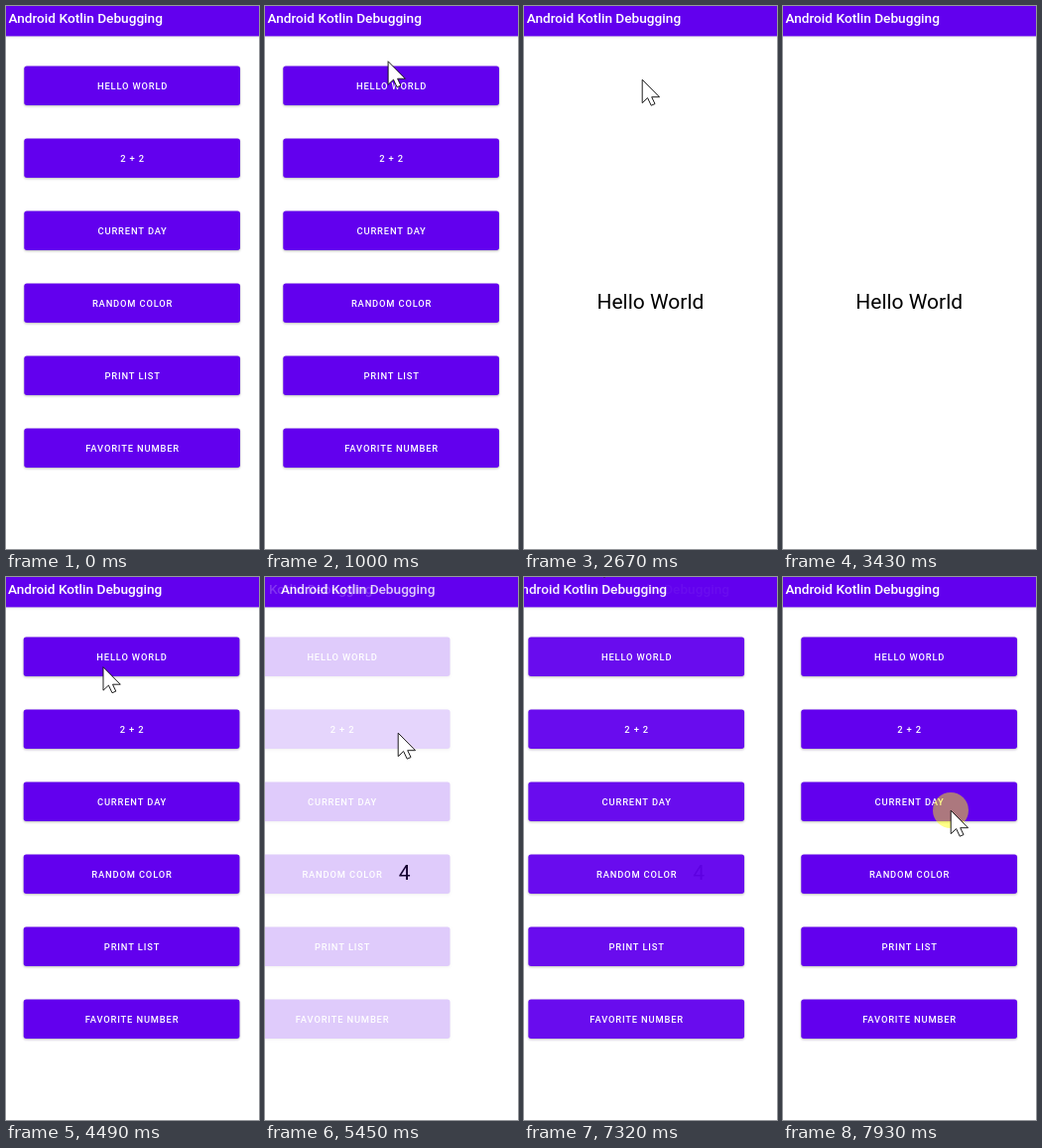
Write an HTML page with a canvas that moves like this. It is 255 px wide and 547 px high and loops after 8 s.

```html
<!DOCTYPE html>
<html lang="en">
<head>
<meta charset="utf-8">
<title>Android Kotlin Debugging</title>
<style>
  html, body { margin: 0; width: 100%; height: 100%; overflow: hidden; background: #fff; }
  canvas { display: block; }
</style>
</head>
<body>
<canvas id="stage" width="255" height="547"></canvas>
<script>
const W = 255, H = 547, LOOP = 8000;
const PURPLE = '#6200ee';
const SLIDE = 63, SLIDE_MS = 450, FADE_MS = 83;
const LABELS = ['HELLO WORLD', '2 + 2', 'CURRENT DAY', 'RANDOM COLOR', 'PRINT LIST', 'FAVORITE NUMBER'];
const BUTTON = { x: 18.3, y: 60.5, w: 217.7, h: 39.4, pitch: 73, r: 2.7 };

// Each press opens a result page, which later closes back to the menu.
const PRESS_MS = 210, OPEN_DELAY = 235;
const VISITS = [
  { text: 'Hello World', button: 0, press: 2060, close: 4157 },
  { text: '4', button: 1, press: 5100, close: 7207 },
  { button: 2, press: 7920, close: Infinity }
];

// The pointer rests between moves; off the top edge it is out of sight.
const ENTRY = { x: 230, y: 549 };
const ABOVE = { x: 71, y: -27 };
const MOVES = [
  { from: 270, to: 1080, x: 121, y: 42 },
  { from: 1130, to: 1610, x: 119, y: 74 },
  { from: 2830, to: 3430, ...ABOVE },
  { from: 4305, to: 4645, x: 118, y: 179 },
  { from: 4800, to: 5100, x: 134, y: 157 },
  { from: 6000, to: 6290, x: 106, y: 13 },
  { from: 6290, to: 6480, ...ABOVE },
  { from: 7300, to: 7890, x: 169, y: 235 }
];
const ARROW = new Path2D('M0 0V23.5L5.4 18.4L9 26L12.8 24.4L9.5 17.5H17.3Z');

const ctx = document.getElementById('stage').getContext('2d');
const layer = Object.assign(document.createElement('canvas'), { width: W, height: H });
const layerCtx = layer.getContext('2d');

const clamp = v => Math.min(1, Math.max(0, v));
const smooth = u => u * u * (3 - 2 * u);
const cubic = (a, b, c, d, s) => {
  const q = 1 - s;
  return a * q * q * q + 3 * b * s * q * q + 3 * c * s * s * q + d * s * s * s;
};

// Two-part curve: quick start, very slow settling.
function settle(t) {
  if (t <= 0) return 0;
  if (t >= 1) return 1;
  const [xs, ys] = t < 1 / 6
    ? [[0, .05, .133333, 1 / 6], [0, 0, .06, .4]]
    : [[1 / 6, .208333, .25, 1], [.4, .82, 1, 1]];
  let lo = 0, hi = 1;
  for (let i = 0; i < 24; i++) {
    const mid = (lo + hi) / 2;
    if (cubic(...xs, mid) < t) lo = mid; else hi = mid;
  }
  return cubic(...ys, lo);
}

function pointerAt(t) {
  let { x, y } = ENTRY;
  for (const move of MOVES) {
    const u = smooth(clamp((t - move.from) / (move.to - move.from)));
    x += (move.x - x) * u;
    y += (move.y - y) * u;
  }
  return { x, y };
}

function setShadow(c, color, blur, dy) {
  c.shadowColor = color;
  c.shadowBlur = blur;
  c.shadowOffsetY = dy;
}

function fillCircle(c, x, y, r, color) {
  c.fillStyle = color;
  c.beginPath();
  c.arc(x, y, r, 0, 2 * Math.PI);
  c.fill();
}

function drawText(c, text, x, y, font, color, align = 'center', spacing = 0) {
  c.font = `${font} Roboto, sans-serif`;
  c.letterSpacing = `${spacing}px`;
  c.textAlign = align;
  c.fillStyle = color;
  c.fillText(text, x, y);
}

function drawPage(c, dx, drawContent) {
  c.fillStyle = '#fff';
  c.fillRect(0, 0, W, H);
  c.save();
  setShadow(c, 'rgba(0,0,0,.2)', 3, 1);
  c.fillStyle = PURPLE;
  c.fillRect(-10, -10, W + 20, 40.4);
  c.restore();
  c.save();
  c.translate(dx, 0);
  drawText(c, 'Android Kotlin Debugging', 2.5, 17.4, '500 13.65px', '#fff', 'left');
  drawContent(c);
  c.restore();
}

function drawRipple(c, visit, t) {
  const grow = clamp((t - visit.press - 30) / 225);
  if (!grow) return;
  const { x, y } = pointerAt(visit.press);
  c.save();
  c.clip();
  fillCircle(c, x, y, 15 + 115 * grow, 'rgba(255,255,255,.2)');
  c.restore();
}

function drawMenu(c, t) {
  LABELS.forEach((label, i) => {
    const { x, w, h, r } = BUTTON;
    const y = BUTTON.y + i * BUTTON.pitch;
    c.beginPath();
    c.roundRect(x, y, w, h, r);
    c.save();
    setShadow(c, 'rgba(0,0,0,.28)', 2.5, 1);
    c.fillStyle = PURPLE;
    c.fill();
    c.restore();
    const visit = VISITS.find(v => v.button === i && t >= v.press && t < v.close);
    if (visit) drawRipple(c, visit, t);
    drawText(c, label, 127.6, y + 23.3, '500 9.35px', '#fff', 'center', .835);
  });
}

function drawScreens(t) {
  const visit = VISITS.find(v => t >= v.press + OPEN_DELAY && t < v.close + SLIDE_MS);
  if (!visit) return drawPage(ctx, 0, c => drawMenu(c, t));

  const closing = t >= visit.close;
  const age = t - (closing ? visit.close : visit.press + OPEN_DELAY);
  const moved = settle(age / SLIDE_MS);
  const shown = closing ? 1 - moved : moved;
  const alpha = closing ? 1 - clamp((age - 35) / FADE_MS) : clamp((age - 50) / FADE_MS);

  drawPage(ctx, -SLIDE * shown, c => drawMenu(c, t));
  if (!alpha) return;
  drawPage(layerCtx, SLIDE * (1 - shown), c => drawText(c, visit.text, 127.2, 305.3, '400 21px', '#000'));
  ctx.globalAlpha = alpha;
  ctx.drawImage(layer, 0, 0);
  ctx.globalAlpha = 1;
}

function drawPointer(t) {
  const { x, y } = pointerAt(t);
  const pressed = VISITS.some(v => t >= v.press && t < v.press + PRESS_MS);
  if (pressed) fillCircle(ctx, x, y, 18, 'rgba(255,255,0,.47)');
  ctx.save();
  ctx.translate(x + .2, y + .2);
  ctx.fillStyle = '#fff';
  ctx.fill(ARROW);
  ctx.strokeStyle = '#111';
  ctx.lineWidth = .95;
  ctx.stroke(ARROW);
  ctx.restore();
}

const start = performance.now();
function render() {
  const t = (performance.now() - start) % LOOP;
  drawScreens(t);
  drawPointer(t);
  requestAnimationFrame(render);
}
render();
</script>
</body>
</html>
```
